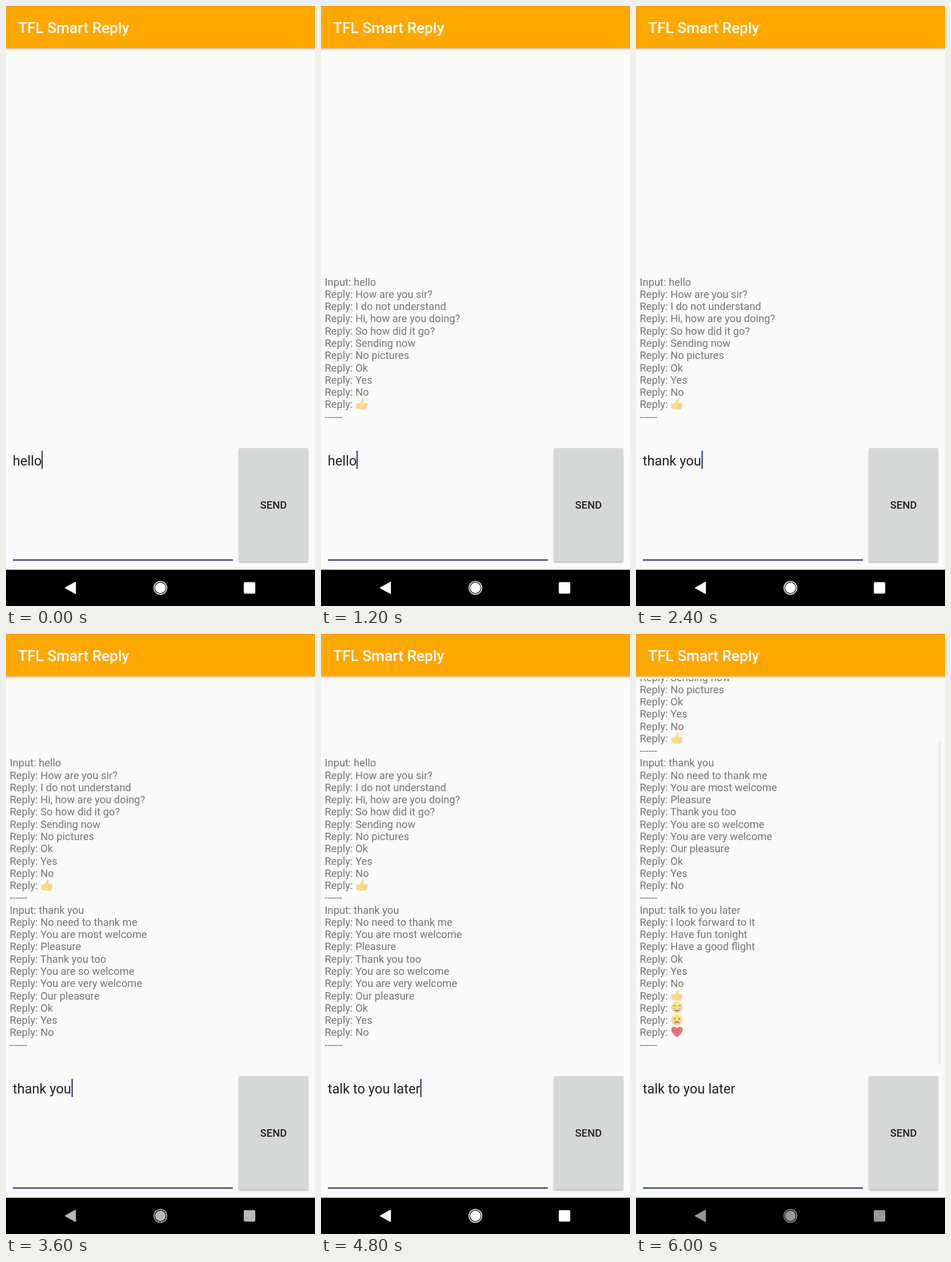
These frames come from a looping animation (538x1042 px, 7.2 s). An HTML page:

```html
<!DOCTYPE html>
<html lang="en">
<head>
<meta charset="utf-8">
<title>Smart Reply</title>
<style>
  html, body { margin: 0; width: 100%; height: 100%; overflow: hidden; background: #fafafa; }
  svg { display: block; width: 538px; height: 1042px; font-family: Roboto, sans-serif; }
  .medium { font-weight: 500; }
  #log { font-size: 18.3px; fill: #757575; white-space: pre; }
</style>
</head>
<body>
<svg viewBox="0 0 538 1042">
  <defs>
    <clipPath id="logArea"><rect y="78" width="538" height="670"/></clipPath>
    <linearGradient id="shade" x2="0" y2="1">
      <stop stop-color="#000" stop-opacity=".2"/>
      <stop offset="1" stop-color="#000" stop-opacity="0"/>
    </linearGradient>
    <filter id="lift" x="-5%" y="-5%" width="110%" height="110%">
      <feDropShadow dx="0" dy="1.6" stdDeviation="1.3" flood-opacity=".32"/>
    </filter>
    <linearGradient id="face" x2="0" y2="1">
      <stop stop-color="#fde030"/><stop offset="1" stop-color="#f5b82a"/>
    </linearGradient>

    <!-- Emoji, each in a 20 by 20 box -->
    <g id="thumb">
      <path d="M0 10Q0 9 1 9H5Q8 7 9 4L10 1Q11-.5 12.5 .7Q14 2 13 5L12.3 8H18Q20 8.3 19.7 10.2Q19.5 11.3 18.8 11.6Q20 12.5 19.4 13.8Q19 14.7 18.2 15Q19 16 18.3 17Q17.8 17.8 17 18Q17 20 14.5 20H9Q6.5 20 5 18.5H1Q0 18.5 0 17.5Z" fill="#fbc02d"/>
      <path d="M13 11.6H18.5M13 15H18M12.5 18H16.5" stroke="#e59600" stroke-width=".9" fill="none"/>
    </g>
    <g id="smile">
      <circle cx="10" cy="10" r="10" fill="url(#face)"/>
      <path d="M3.5 8Q5.7 4.5 7.8 8M12.2 8Q14.3 4.5 16.5 8" fill="none" stroke="#422b0d" stroke-width="1.3" stroke-linecap="round"/>
      <path d="M4.5 11.5Q10 13.3 15.5 11.5Q14.5 17 10 17T4.5 11.5" fill="#422b0d"/>
      <path d="M5.4 12.1Q10 13.6 14.6 12.1L14 13.6Q10 14.8 6 13.6Z" fill="#fff"/>
    </g>
    <g id="frown">
      <circle cx="10" cy="10" r="10" fill="url(#face)"/>
      <ellipse cx="6.2" cy="8.5" rx="1.4" ry="1.8" fill="#422b0d"/>
      <ellipse cx="13.8" cy="8.5" rx="1.4" ry="1.8" fill="#422b0d"/>
      <path d="M6 16Q6.7 12.5 10 12.5T14 16Q10 14 6 16" fill="#422b0d" stroke="#422b0d"/>
    </g>
    <path id="heart" d="M10 19Q0 12 0 6.2Q0 1 5 1Q8.5 1 10 4Q11.5 1 15 1Q20 1 20 6.2Q20 12 10 19" fill="#d50000"/>
  </defs>

  <rect width="538" height="1042" fill="#fafafa"/>
  <g clip-path="url(#logArea)"><g id="log"></g></g>
  <rect id="scrollbar" x="526" y="186" width="5.3" height="560" fill="#ededed"/>

  <rect y="73" width="538" height="5" fill="url(#shade)"/>
  <rect width="538" height="73.5" fill="#ffa800"/>
  <rect width="538" height="1.2" fill="#ff8f00"/>
  <text class="medium" x="21" y="47.3" font-size="26.2" fill="#fff">TFL Smart Reply</text>

  <text id="input" x="11.7" y="797.8" font-size="23.6" fill="#212121"></text>
  <rect id="cursor" y="772.5" width="2.6" height="31.5" fill="#485270"/>
  <rect x="12" y="960.8" width="383" height="2.7" fill="#485270"/>

  <rect x="405.3" y="767.8" width="120.8" height="197" rx="2.5" fill="#d6d8d7" filter="url(#lift)"/>
  <text class="medium" x="465.7" y="873.3" font-size="18.3" fill="#212121" text-anchor="middle">SEND</text>

  <rect y="979" width="538" height="63" fill="#000"/>
  <g id="nav">
    <path d="M103.3 1010.5L121 1000.7V1020.3Z" stroke-width="1.5" stroke-linejoin="round"/>
    <circle cx="268.8" cy="1010.5" r="9.3" stroke="none"/>
    <circle cx="268.8" cy="1010.5" r="11.2" fill="none" stroke-width="1.5"/>
    <rect x="414" y="1000.5" width="20" height="20" rx="2" stroke="none"/>
  </g>
</svg>
<script>
const STEP = 1200, LINE = 21.27, LAST_BASELINE = 719.6;
const byId = id => document.getElementById(id);

const exchanges = [
  ["hello", "How are you sir?", "I do not understand", "Hi, how are you doing?", "So how did it go?",
   "Sending now", "No pictures", "Ok", "Yes", "No", "#thumb"],
  ["thank you", "No need to thank me", "You are most welcome", "Pleasure", "Thank you too",
   "You are so welcome", "You are very welcome", "Our pleasure", "Ok", "Yes", "No"],
  ["talk to you later", "I look forward to it", "Have fun tonight", "Have a good flight",
   "Ok", "Yes", "No", "#thumb", "#smile", "#frown", "#heart"]
];
const cursorX = [61.6, 113.9, 172.6];
const navColors = ["#fff", "#fff", "#fff", "#b8b8b8", "#fff", "#999"];

function logLine(text, row, y) {
  const emoji = text.startsWith("#");
  const label = row ? "Reply: " : "Input: ";
  return `<text x="6.6" y="${y}">${label}${emoji ? "" : text}</text>` +
    (emoji ? `<use href="${text}" x="61.3" y="${y - 17.2}" opacity=".54"/>` : "");
}

function renderLog(count) {
  const rows = exchanges.slice(0, count).flatMap(lines =>
    [...lines.map((text, row) => y => logLine(text, row, y)),
     y => `<text x="6.6" y="${y}">------</text>`]);
  return rows.map((draw, i) => draw(LAST_BASELINE - (rows.length - 1 - i) * LINE)).join("");
}

let shown = -1;
function frame(now) {
  const step = Math.floor(now / STEP) % 6;
  if (step !== shown) {
    shown = step;
    const turn = step >> 1;
    byId("log").innerHTML = renderLog(Math.ceil(step / 2));
    byId("input").textContent = exchanges[turn][0];
    byId("cursor").setAttribute("x", cursorX[turn]);
    byId("cursor").style.display = step === 5 ? "none" : "";
    byId("scrollbar").style.display = step === 5 ? "" : "none";
    byId("nav").setAttribute("fill", navColors[step]);
    byId("nav").setAttribute("stroke", navColors[step]);
  }
  requestAnimationFrame(frame);
}
const start = performance.now();
requestAnimationFrame(now => frame(Math.max(0, now - start)));
</script>
</body>
</html>
```
